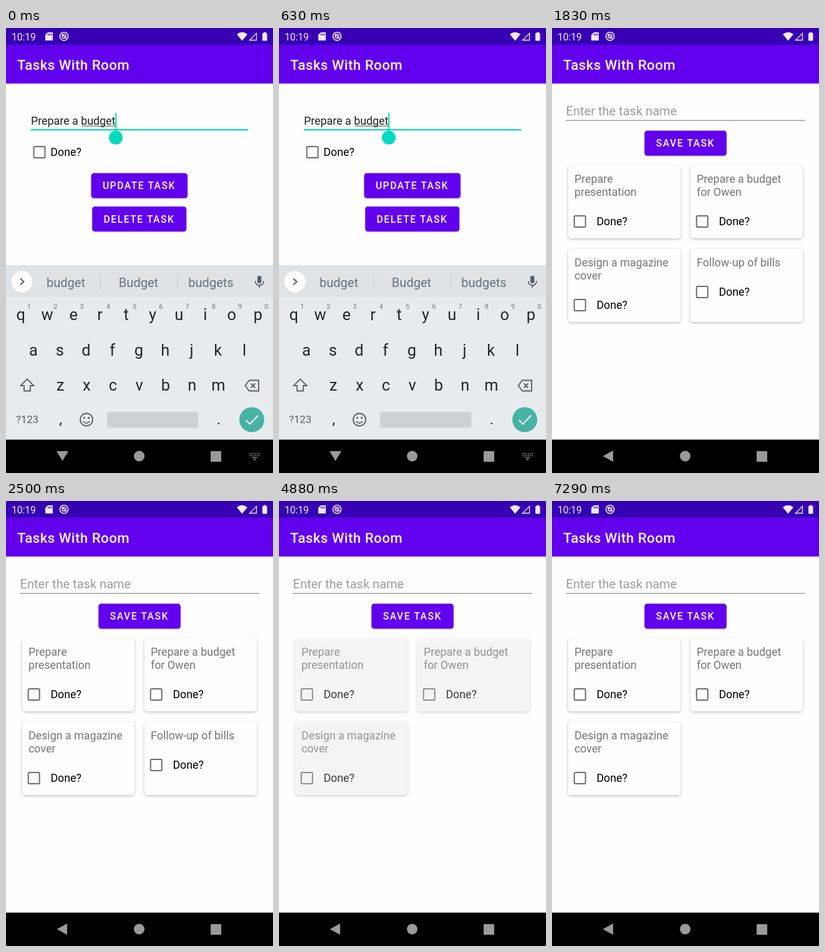
Animation of 428 by 713 pixels, one loop 7.54 s. Source, as an HTML page with a canvas:

```html
<!DOCTYPE html>
<html lang="en">
<head>
<meta charset="utf-8">
<title>Tasks With Room</title>
<style>
html, body { margin: 0; width: 100%; height: 100%; overflow: hidden; background: #fefefe; }
canvas { display: block; width: 428px; height: 713px; }
</style>
</head>
<body>
<canvas id="stage"></canvas>
<script>
const W = 428, H = 713, LOOP = 7540;
const canvas = document.getElementById('stage');
const ctx = canvas.getContext('2d');
const dpr = window.devicePixelRatio || 1;
canvas.width = W * dpr;
canvas.height = H * dpr;

const PAGE = '#fefefe', PURPLE = '#6200ee', STATUS = '#3700b3', TEAL = '#03dac0';
const KEY_INK = '#1d272c', KEY_GRAY = '#566168', NAV = '#9a9a9a';

// Times in ms
const SAVED = 1570, OPENED = 2690, DELETED = 4745;
const CARD_FADE = 120, LOAD_DELAY = 55, HIDE_DELAY = 40, HIDE = 190;

const clamp = v => Math.max(0, Math.min(1, v));
const span = (t, start, length) => clamp((t - start) / length);
const ease = p => (1 - Math.cos(Math.PI * p)) / 2;

function text(str, x, y, size, color, { weight = 400, align = 'left', spacing = 0 } = {}) {
  ctx.font = `${weight} ${size}px Roboto, sans-serif`;
  ctx.textAlign = align;
  ctx.letterSpacing = spacing + 'px';
  ctx.fillStyle = color;
  ctx.fillText(str, x, y);
}

function rect(x, y, w, h, color, r = 0) {
  ctx.fillStyle = color;
  ctx.beginPath();
  ctx.roundRect(x, y, w, h, r);
  ctx.fill();
}

function circle(x, y, r, color) {
  ctx.fillStyle = color;
  ctx.beginPath();
  ctx.arc(x, y, r, 0, Math.PI * 2);
  ctx.fill();
}

function ring(x, y, r, color, width) {
  ctx.strokeStyle = color;
  ctx.lineWidth = width;
  ctx.beginPath();
  ctx.arc(x, y, r, 0, Math.PI * 2);
  ctx.stroke();
}

function shape(d, color, width = 0) {
  const path = new Path2D(d);
  if (width) {
    ctx.strokeStyle = color;
    ctx.lineWidth = width;
    ctx.stroke(path);
  } else {
    ctx.fillStyle = color;
    ctx.fill(path);
  }
}

function shadow(color, blur, y) {
  ctx.shadowColor = color;
  ctx.shadowBlur = blur * dpr;
  ctx.shadowOffsetY = y * dpr;
}

function statusBar() {
  const ink = '#f1ecfa';
  rect(0, 0, W, 27, STATUS);
  text('10:19', 9, 19.5, 15.6, ink);
  shape('M67 7H75V20H63V11Z', ink);
  for (let i = 0; i < 3; i++) rect(67 + i * 2.6, 9, 1.3, 3, STATUS);
  ring(93, 13.3, 6.6, ink, 1.6);
  ring(93, 13.3, 3, ink, 1.5);
  shape('M89.5 9.5L97 17', ink, 1.5);
  shape('M370 10Q378.5 3.5 387 10L378.5 20.5Z', ink);
  shape('M401.5 8.5V19.5H390.5Z', ink, 1.3);
  rect(411, 8, 7.5, 12.5, ink, 1);
  rect(413, 6.6, 3.5, 2, ink);
}

function appBar() {
  rect(0, 27, W, 62, PURPLE);
  text('Tasks With Room', 18, 67, 22.3, '#fbf8ff', { weight: 500, spacing: 0.45 });
}

function navBar(typing) {
  rect(0, 659.5, W, 53.5, '#000');
  shape(typing ? 'M81 678H100L90.5 693.5Z' : 'M98 677V695L81.5 686Z', NAV);
  circle(213.5, 686, 8.5, NAV);
  rect(328, 678, 17, 17, NAV, 1);
  if (!typing) return;
  for (let r = 0; r < 2; r++)
    for (let i = 0; i < 6; i++) rect(390 + i * 3.1, 681.5 + r * 3, 1.6, 1.6, NAV);
  rect(394.5, 687.5, 8, 1.4, NAV);
  shape('M396 690.5H401L398.5 693Z', NAV);
}

function button(label, x, y, w) {
  ctx.save();
  shadow('rgba(0,0,0,.3)', 2, 1);
  rect(x, y, w, 40, PURPLE, 4.4);
  ctx.restore();
  text(label, x + 18.4, y + 25.8, 15.6, '#fbf8ff', { weight: 500, spacing: 1.54 });
}

function check(x, y, gap) {
  ctx.strokeStyle = '#6c6c6c';
  ctx.lineWidth = 2;
  ctx.beginPath();
  ctx.roundRect(x + 1, y + 1, 18, 18, 1.5);
  ctx.stroke();
  text('Done?', x + gap, y + 16.2, 17.83, '#000');
}

function editScreen(task, focused) {
  text(task, 40, 155, 17.83, '#212121');
  if (focused) {
    rect(121, 156.6, 55, 1, '#404040');
    rect(40, 162, 348, 2.2, TEAL);
    rect(175.2, 136, 2, 26, TEAL);
    circle(176, 175.6, 11, TEAL);
    shape('M176 163.5L184 171H168Z', TEAL);
  } else {
    rect(40, 162.3, 348, 1.1, '#8e8e8e');
  }
  check(43.5, 189, 27.8);
  button('UPDATE TASK', 136.5, 232.5, 154.5);
  button('DELETE TASK', 138.2, 286, 151);
}

function card(x, y, lines, alpha) {
  ctx.save();
  ctx.globalAlpha = alpha;
  shadow('rgba(0,0,0,.25)', 4, 1.4);
  rect(x, y, 180, 117, '#dcdcdc', 4.4);
  ctx.shadowColor = 'transparent';
  rect(x, y, 180, 117, PAGE, 4.4);
  lines.forEach((line, i) => text(line, x + 10, y + 28 + i * 21, 17.83, '#757575'));
  check(x + 8.7, y + 38 + lines.length * 21, 36.7);
  ctx.restore();
}

const tasks = [
  ['Prepare', 'presentation'],
  ['Prepare a budget', 'for Owen'],
  ['Design a magazine', 'cover'],
  ['Follow-up of bills']
];

function listScreen(count, alpha) {
  text('Enter the task name', 22.5, 140, 20.06, '#9c9c9c');
  rect(22, 147.6, 384, 1.1, '#8e8e8e');
  button('SAVE TASK', 148.3, 164.5, 131.5);
  if (alpha <= 0) return;
  tasks.slice(0, count).forEach((lines, i) =>
    card(26 + (i % 2) * 196, 220 + (i >> 1) * 134, lines, alpha));
}

function keyRow(keys, x, y) {
  [...keys].forEach((key, i) => text(key, x + i * 42.25, y, 25.4, KEY_INK, { align: 'center' }));
}

function suggestions() {
  rect(0, 380, W, 51, '#dfe3e6');
  circle(25.5, 406.5, 17, '#fdfdfd');
  shape('M23 401.5L28.5 406.5L23 411.5', KEY_GRAY, 2);
  [['budget', 96], ['Budget', 212.5], ['budgets', 328.5]].forEach(([word, x]) =>
    text(word, x, 414.5, 20.06, '#65727a', { align: 'center' }));
  rect(151, 394, 1, 25, '#c3c9cd');
  rect(274.5, 394, 1, 25, '#c3c9cd');
  rect(403, 397, 6.4, 12, KEY_GRAY, 3.2);
  shape('M399.5 405.5A6.7 6.7 0 0 0 413 405.5M406.2 412V416.5', KEY_GRAY, 1.8);
}

function keyboard(gone) {
  if (gone >= 1) return;
  ctx.save();
  ctx.beginPath();
  ctx.rect(0, 89, W, 570.5);
  ctx.clip();
  ctx.globalAlpha = 1 - gone;
  ctx.translate(0, 28 * gone);
  rect(0, 431, W, 229, '#e8ebee');
  suggestions();

  keyRow('qwertyuiop', 23.7, 468);
  [...'1234567890'].forEach((n, i) =>
    text(n, 37 + i * 42.25, 450, 11, '#6c777e', { align: 'center' }));
  keyRow('asdfghjkl', 44, 524.5);
  keyRow('zxcvbnm', 87, 580.5);

  shape('M34 562.5L44.5 573H39V581.5H29V573H23.5Z', KEY_GRAY, 1.8);
  shape('M390 564.5H405V581.5H390L383.5 573Z', KEY_GRAY, 1.9);
  shape('M392.5 569.5L399.5 576.5M399.5 569.5L392.5 576.5', KEY_GRAY, 1.8);

  text('?123', 34, 633, 16.7, KEY_GRAY, { align: 'center' });
  text(',', 87.5, 635, 24, KEY_INK, { align: 'center' });
  text('.', 341, 635, 24, KEY_INK, { align: 'center' });
  ring(129, 627.5, 10, KEY_GRAY, 1.9);
  circle(125.4, 624.6, 1.6, KEY_GRAY);
  circle(132.6, 624.6, 1.6, KEY_GRAY);
  shape('M124 630Q129 636 134 630', KEY_GRAY, 1.8);
  rect(162, 615, 146.5, 25.5, '#cdd1d6', 4);
  circle(394, 627.5, 20, '#47b3a5');
  shape('M384.5 628L391 634.5L404 621', '#fbfdfd', 2);
  ctx.restore();
}

function touch(x, y, alpha) {
  if (alpha <= 0) return;
  ctx.save();
  ctx.globalAlpha = alpha;
  circle(x, y, 12, 'rgba(255,255,255,.35)');
  ring(x, y, 12, 'rgba(250,250,250,.8)', 1.5);
  ctx.restore();
}

function draw(t) {
  ctx.setTransform(dpr, 0, 0, dpr, 0, 0);
  rect(0, 0, W, H, PAGE);
  statusBar();
  appBar();

  const fadeFrom = start => ease(span(t, start + LOAD_DELAY, CARD_FADE));
  if (t < SAVED) editScreen('Prepare a budget', true);
  else if (t < OPENED) listScreen(4, fadeFrom(SAVED));
  else if (t < DELETED) editScreen('Follow-up of bills', false);
  else listScreen(3, fadeFrom(DELETED));

  keyboard(ease(span(t, SAVED + HIDE_DELAY, HIDE)));
  if (t >= 4630) touch(187, 308, 0.6 * (1 - span(t, DELETED, 170)));
  navBar(t < SAVED + HIDE_DELAY);
}

const start = performance.now();
function tick() {
  draw((performance.now() - start) % LOOP);
  requestAnimationFrame(tick);
}
tick();
</script>
</body>
</html>
```
